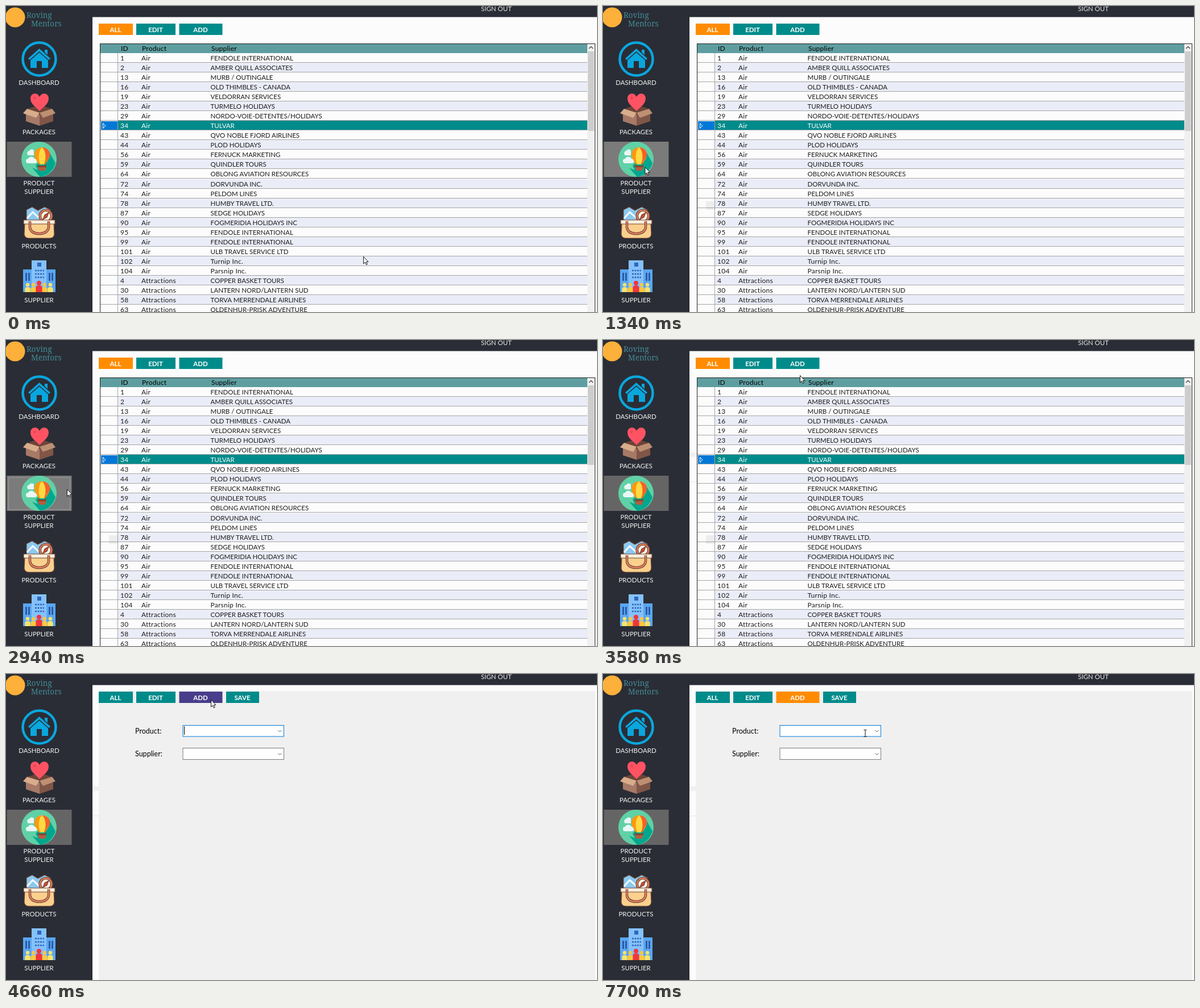
An HTML page that plays this animation: 1039x539 px, repeating every 8 s.

```html
<!DOCTYPE html>
<html lang="en">
<head>
<meta charset="utf-8">
<title>Product suppliers</title>
<style>
  html, body { margin: 0; width: 100%; height: 100%; overflow: hidden; background: #fcfcfc; }
  svg { display: block; font: 11.5px Lato, sans-serif; }
  .menu { fill: #f2f2f2; text-anchor: middle; }
  .brand { font: 13.5px "Noto Serif", serif; fill: #438b96; }
  .button { font-weight: bold; fill: #fff; text-anchor: middle; }
  .word { font-size: 12px; letter-spacing: .25px; }
  .label { font-size: 12.5px; }
</style>
</head>
<body>
<svg id="stage" width="1039" height="539" viewBox="0 0 1039 539">
  <rect width="1039" height="539" fill="#fcfcfc"/>
  <path d="M0 0H1039V19.5H152V539H0Z" fill="#2a2d35"/>
  <text x="835" y="9" fill="#e6e6e6">SIGN OUT</text>
  <circle cx="16" cy="20" r="17.5" fill="#fdb03a"/>
  <text class="brand" x="36" y="21">Roving</text>
  <text class="brand" x="44" y="36">Mentors</text>

  <g id="dashboard">
    <circle cx="58.5" cy="93.500" r="29" fill="none" stroke="#0aa6de" stroke-width="4.5"/>
    <path d="M58.500 75L78 92.500L75.500 95L58.500 80L41.500 95L39 92.500ZM68 77h5v9l-5-4.500Z" fill="#0aa6de"/>
    <path d="M58.500 82L74 95.500V109H63V97H54V109H43V95.500Z" fill="#0aa6de"/>
  </g>

  <g id="packages">
    <path d="M38 181L59 174L80 181L59 190Z" fill="#6d4438"/>
    <path d="M59 185C53 178 43 173 43 163C43 153 55 151 59 160C63 151 75 153 75 163C75 173 65 178 59 185Z" fill="#ff5364"/>
    <path d="M48 162h5m-2.500-2.500v5" stroke="#d9374a" fill="none"/>
    <path d="M35 184L59 191V211L35 203Z" fill="#a67a67"/>
    <path d="M83 184L59 191V211L83 203Z" fill="#7f5648"/>
    <path d="M37 181L59 188L53 197L30 189Z" fill="#d8ad8b"/>
    <path d="M81 181L59 188L65 197L87 189Z" fill="#bd9073"/>
  </g>

  <g id="supplierTab">
    <rect id="tab" x="1.500" y="239" width="114" height="62"/>
    <rect id="tabFocus" x="4.500" y="242.500" width="108" height="56" fill="none" stroke="#b4b4b4" stroke-dasharray="1 1"/>
    <circle cx="58" cy="270" r="31" fill="#60d1a6"/>
    <path d="M76 257L87 277Q80 298 60 301L46 285L56 289L52 281Z" fill="#00a78e"/>
    <path d="M39 263a4.500 4.500 0 0 1 2-8a5 5 0 0 1 8-1v9ZM39 277a4 4 0 0 1 0-8a6 6 0 0 1 11 0a4 4 0 0 1 1 8Z" fill="#e9f7f5"/>
    <path d="M63.500 249C54 249 50 256 50 262C50 269 56 274 57.500 279H69.500C71 274 77 269 77 262C77 256 73 249 63.500 249Z" fill="#ff9811"/>
    <path d="M63.500 249C57 253 56 271 60.500 279H66.500C71 271 70 253 63.500 249Z" fill="#ffda44"/>
    <path d="M63.500 249C77 250 80 262 75 268Q69 275 69.500 279H67C72 268 70 254 63.500 249Z" fill="#f5602b"/>
    <path d="M57 278L58 283M70 278L69 283" stroke="#804a32"/>
    <path d="M56 281H71L69 290H58Z" fill="#b55d3e"/>
    <path d="M56 281H71V284H56Z" fill="#86452f"/>
  </g>

  <g id="products" stroke="#6e4337" stroke-width="1.200">
    <path d="M36 359L46 354L56 360L68 354L78 359V383H36Z" fill="#8cc9ef"/>
    <path d="M37 374L47 363L57 372L66 366" fill="none" stroke="#f5fbff" stroke-width="3"/>
    <circle cx="70" cy="370" r="12" fill="#df7c55"/>
    <circle cx="70" cy="370" r="8.500" fill="#fff5e6"/>
    <path d="M75 364L72 372L65 376L68 368Z" fill="#ce4b3c"/>
    <path d="M33 381H84L85 402Q84 409 77 409H40Q33 409 32 402Z" fill="#fbd08d"/>
    <path d="M31 377H86V384H31Z" fill="#fff0dc"/>
    <path d="M42 379V390Q44 401 58 401Q73 401 75 390V379" fill="none" stroke="#6e4337" stroke-width="4.500"/>
    <path d="M42 379V390Q44 401 58 401Q73 401 75 390V379" fill="none" stroke="#e07f5e" stroke-width="2.500"/>
  </g>

  <g id="supplier">
    <path d="M30 464H87V504H30Z" fill="#5aa6f2"/>
    <path d="M45 448H71V504H45Z" fill="#85c1fb"/>
    <path d="M55 452h7v7h-7Z" fill="#2f68b8"/>
    <path d="M51 466H67M51 472H67M51 478H67" stroke="#2f68b8" stroke-width="2.500" stroke-dasharray="3 1.500"/>
    <path d="M35.500 470V484M40.500 470V484M76.500 470V484M81.500 470V484" stroke="#244f96" stroke-width="2.500"/>
    <g id="people"></g>
  </g>
  <g id="menu"></g>

  <g id="ghost" fill="#f0f0f0">
    <rect x="152" y="198" width="13" height="8"/>
    <rect x="152" y="249" width="13" height="2"/>
  </g>

  <g id="list">
    <rect x="165.500" y="66.500" width="870" height="490" fill="#fcfcfc" stroke="#222"/>
    <rect x="166" y="67" width="856" height="16" fill="#5f9ea0"/>
    <g class="word"><text x="202" y="79">ID</text><text x="239" y="79">Product</text><text x="361" y="79">Supplier</text></g>
    <g id="rows"></g>
    <path d="M196.500 83V539" stroke="#a6a6a6"/>
    <rect x="167" y="203" width="29" height="15" fill="#0078d7"/>
    <path d="M170.500 206.500L175 211L170.500 215.500Z" fill="none" stroke="#fff"/>
    <rect id="smudge" x="181" y="344" width="16" height="15" opacity=".06"/>
    <rect x="1022" y="67" width="13" height="472" fill="#f0f0f0"/>
    <rect x="1023" y="80" width="11" height="140" fill="#cdcdcd"/>
    <path d="M1025 75L1028.500 71.500L1032 75" fill="none" stroke="#505050" stroke-width="1.500"/>
  </g>

  <g id="form">
    <rect x="163" y="30" width="873" height="509" fill="#f0f0f0"/>
    <text class="label" x="227" y="105">Product:</text>
    <text class="label" x="227" y="145">Supplier:</text>
    <g fill="#fff">
      <rect x="311" y="90.500" width="177.500" height="19.500" stroke="#0078d7"/>
      <rect x="311" y="130.500" width="177.500" height="20" stroke="#7a7a7a"/>
    </g>
    <path d="M478.500 99L481.500 102L484.500 99M478.500 139.500L481.500 142.500L484.500 139.500" fill="none" stroke="#555"/>
    <path id="caret" d="M313.500 92V107" stroke="#000"/>
  </g>

  <g id="buttons"></g>
  <g id="addFocus" fill="none">
    <rect x="305" y="31.500" width="75" height="19" stroke="#2c2560"/>
    <rect x="307.500" y="33.500" width="70" height="15" stroke="#4fb9d6"/>
  </g>
  <path id="arrow" d="M.5.5V13L3.400 10.300L5.300 14.700L7.200 13.900L5.300 9.600H9Z" fill="#fff" stroke="#000" stroke-width=".9"/>
  <path id="beam" d="M-2.500-6H-.5L0-5.500L.5-6H2.500M0-5.500V5.500M-2.500 6H-.5L0 5.500L.5 6H2.500" fill="none" stroke="#111"/>
</svg>
<script>
const el = id => document.getElementById(id);
const TEAL = '#008b8b', ORANGE = '#ff8c00', INDIGO = '#483d8b';

const suppliers = `1 FENDOLE INTERNATIONAL
2 AMBER QUILL ASSOCIATES
13 MURB / OUTINGALE
16 OLD THIMBLES - CANADA
19 VELDORRAN SERVICES
23 TURMELO HOLIDAYS
29 NORDO-VOIE-DETENTES/HOLIDAYS
34 TULVAR
43 QVO NOBLE FJORD AIRLINES
44 PLOD HOLIDAYS
56 FERNUCK MARKETING
59 QUINDLER TOURS
64 OBLONG AVIATION RESOURCES
72 DORVUNDA INC.
74 PELDOM LINES
78 HUMBY TRAVEL LTD.
87 SEDGE HOLIDAYS
90 FOGMERIDIA HOLIDAYS INC
95 FENDOLE INTERNATIONAL
99 FENDOLE INTERNATIONAL
101 ULB TRAVEL SERVICE LTD
102 Turnip Inc.
104 Parsnip Inc.
4 COPPER BASKET TOURS
30 LANTERN NORD/LANTERN SUD
58 TORVA MERRENDALE AIRLINES
63 OLDENHUR-PRISK ADVENTURE`.split('\n');

el('rows').innerHTML = suppliers.map((line, i) => {
  const [, id, name] = line.match(/^(\d+) (.+)$/);
  const top = 83 + Math.round(17.04 * i), base = top + 13, selected = i === 7;
  const back = selected ? TEAL : i % 2 ? '#eaecf7' : '#fcfcfc';
  const nameClass = /[a-z]/.test(name) ? 'class="word"' : '';
  return `<rect x="197" y="${top}" width="825" height="17" fill="${back}"/>
    <path d="M166 ${top + 16.5}H1022" stroke="#a6a6a6"/>
    <g fill="${selected ? '#fff' : '#1c1c1c'}">
      <text class="word" x="201" y="${base}">${id}</text>
      <text class="word" x="238" y="${base}">${i < 23 ? 'Air' : 'Attractions'}</text>
      <text ${nameClass} x="359.5" y="${base}">${name}</text>
    </g>`;
}).join('');

const menu = { DASHBOARD: 139, PACKAGES: 226, PRODUCT: 316, 'SUPPLIER ': 331, PRODUCTS: 427, SUPPLIER: 522 };
el('menu').innerHTML = Object.entries(menu)
  .map(([label, y]) => `<text class="menu" x="58" y="${y}">${label.trim()}</text>`).join('');

el('people').innerHTML = [38, 48, 68, 78, 58].map(x => {
  const lead = x === 58, r = lead ? 4 : 3.2, y = lead ? 488 : 491;
  const color = lead ? '#f0353d' : x === 38 || x === 78 ? '#f9e36b' : '#fbc83c';
  return `<g fill="${color}"><circle cx="${x}" cy="${y}" r="${r}"/>
    <path d="M${x - r - 1.5} 504V${y + 8}q0-4 ${r + 1.5}-4t${r + 1.5} 4V504Z"/></g>`;
}).join('');

const buttons = { ALL: [163, 60], EDIT: [229, 69], ADD: [304.5, 76], SAVE: [387, 58] };
el('buttons').innerHTML = Object.entries(buttons).map(([label, [x, width]]) =>
  `<g id="${label}"><rect x="${x}" y="31" width="${width}" height="20" fill="${TEAL}"/>
   <text class="button" x="${x + width / 2 - .5}" y="46">${label}</text></g>`).join('');

// Pointer positions: time, x, y. The pointer jumps from one to the next.
const pointer = [
  [0, 628, 441], [140, 620, 441], [290, 613, 441], [410, 609, 441],
  [550, 545, 430], [670, 370, 395], [790, 181, 344], [910, 80, 288],
  [1060, 74.5, 284], [1340, 73.5, 283.5], [2940, 107, 262.5], [3070, 144, 241],
  [3220, 157, 198], [3340, 235, 146], [3460, 305, 98], [3580, 346, 62],
  [3700, 361, 46], [3870, 360, 45], [5340, 361, 47], [5460, 363, 54],
  [5580, 366, 63], [5700, 370, 74], [5820, 374, 84], [5940, 378, 89],
  [6080, 387, 97.5], [6220, 393, 103.5], [7010, 404, 103.5], [7130, 414, 103.5],
  [7410, 444.5, 104.5], [7560, 461, 104.5]
];

const show = (id, on) => el(id).style.display = on ? '' : 'none';
const paint = (id, color) => el(id).firstElementChild.setAttribute('fill', color);

function draw() {
  const t = performance.now() % 8000;
  const within = (from, to) => t >= from && t < to;
  const adding = t >= 4660, typing = t >= 6080;

  show('list', !adding);
  show('form', adding);
  show('SAVE', adding);
  show('ghost', t >= 3220);
  show('smudge', t >= 790);
  show('caret', within(4660, 5060) || within(5580, 6620) || within(7130, 7700));

  paint('ALL', adding ? TEAL : ORANGE);
  paint('ADD', within(3700, 5460) ? INDIGO : adding ? ORANGE : TEAL);
  show('addFocus', within(4540, 4660));

  const tabColor = within(1600, 1760) ? '#707070' : within(910, 3070) ? '#7b7b7b' : '#656565';
  el('tab').setAttribute('fill', tabColor);
  show('tabFocus', within(1600, 3070));

  const [, x, y] = pointer.findLast(([time]) => time <= t);
  show('arrow', !typing);
  show('beam', typing);
  el(typing ? 'beam' : 'arrow').setAttribute('transform', `translate(${x} ${y})`);
  requestAnimationFrame(draw);
}
draw();
</script>
</body>
</html>
```
